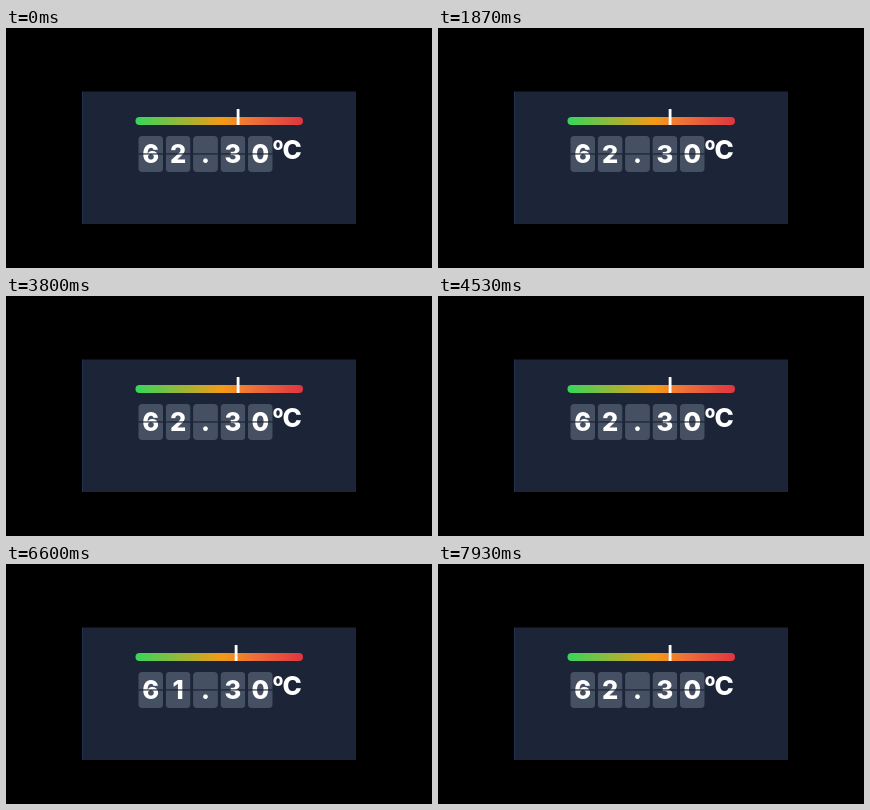
An HTML page with a canvas that plays this animation: 426x240 px, repeating every 8000 ms.

```html
<!DOCTYPE html>
<html lang="en">
<head>
<meta charset="utf-8">
<title>Temperature gauge</title>
<style>
html, body { margin: 0; width: 100%; height: 100%; overflow: hidden; background: #000; }
canvas { display: block; width: 426px; height: 240px; }
</style>
</head>
<body>
<canvas id="stage"></canvas>
<script>
const LOOP = 8000, FLIP = 400, GLIDE = 500;
// Each reading: start time in ms and temperature.
const readings = [[0, 62.3], [1850, 61.8], [3050, 62.3], [5800, 61.3], [7150, 62.3]];
const CARD = { x: 132.3, y: 108, w: 24.8, h: 36, step: 27.4, mid: 126 };

const canvas = document.getElementById('stage');
const ctx = canvas.getContext('2d');
const ratio = window.devicePixelRatio || 1;
canvas.width = 426 * ratio;
canvas.height = 240 * ratio;
ctx.scale(ratio, ratio);

const barFill = ctx.createLinearGradient(130, 0, 297, 0);
[[0, '#36d65a'], [0.52, '#f59a16'], [0.7, '#ee7038'], [1, '#df353f']]
  .forEach(([at, color]) => barFill.addColorStop(at, color));

const easeInOut = p => p < 0.5 ? 2 * p * p : 1 - 2 * (1 - p) * (1 - p);

function rect(x, y, w, h, color, r = 0) {
  ctx.fillStyle = color;
  ctx.beginPath();
  ctx.roundRect(x, y, w, h, r);
  ctx.fill();
}

function write(text, x, y, size, align = 'center') {
  ctx.font = `800 ${size}px Inter, sans-serif`;
  ctx.textAlign = align;
  ctx.fillStyle = '#fff';
  ctx.fillText(text, x, y);
}

// Draws the top or bottom half of a card, folded about its middle line.
function half(char, x, top, fold = 1) {
  if (fold <= 0) return;
  ctx.save();
  ctx.translate(0, CARD.mid);
  ctx.scale(1, fold);
  ctx.translate(0, -CARD.mid);
  ctx.beginPath();
  ctx.rect(x, top ? CARD.y : CARD.mid, CARD.w, CARD.h / 2);
  ctx.clip();
  rect(x, CARD.y, CARD.w, CARD.h, '#465063', 4);
  write(char, x + CARD.w / 2, 135, 25.5);
  ctx.restore();
}

function flipCard(i, from, to, p) {
  const x = CARD.x + i * CARD.step;
  if (from === to) p = 1;
  half(to, x, true);
  half(p < 1 ? from : to, x, false);
  if (p < 0.5) half(from, x, true, 1 - 2 * p);
  else if (p < 1) half(to, x, false, 2 * p - 1);
  rect(x, CARD.mid - 0.6, CARD.w, 1.1, '#171d2b');
}

function draw(t) {
  const now = readings.findLastIndex(r => r[0] <= t);
  const [start, value] = readings[now];
  const before = now ? readings[now - 1][1] : value;
  const flip = Math.min(1, (t - start) / FLIP);
  const glide = easeInOut(Math.min(1, (t - start) / GLIDE));
  const level = before + (value - before) * glide;

  rect(0, 0, 426, 240, '#000');
  rect(76, 63.5, 274, 132.5, '#1c2438');
  rect(76, 63.5, 0.8, 132.5, '#26365a');
  rect(129.5, 89, 167.5, 8, barFill, 4);
  rect(232.1 + (level - 62.3) * 2 - 1.4, 81, 2.8, 16, '#fff', 0.6);

  const from = before.toFixed(2), to = value.toFixed(2);
  for (let i = 0; i < to.length; i++) flipCard(i, from[i], to[i], flip);

  write('o', 266.7, 122, 17, 'left');
  write('C', 276.6, 130.6, 26, 'left');
}

function tick() {
  draw(performance.now() % LOOP);
  requestAnimationFrame(tick);
}
tick();
</script>
</body>
</html>
```
